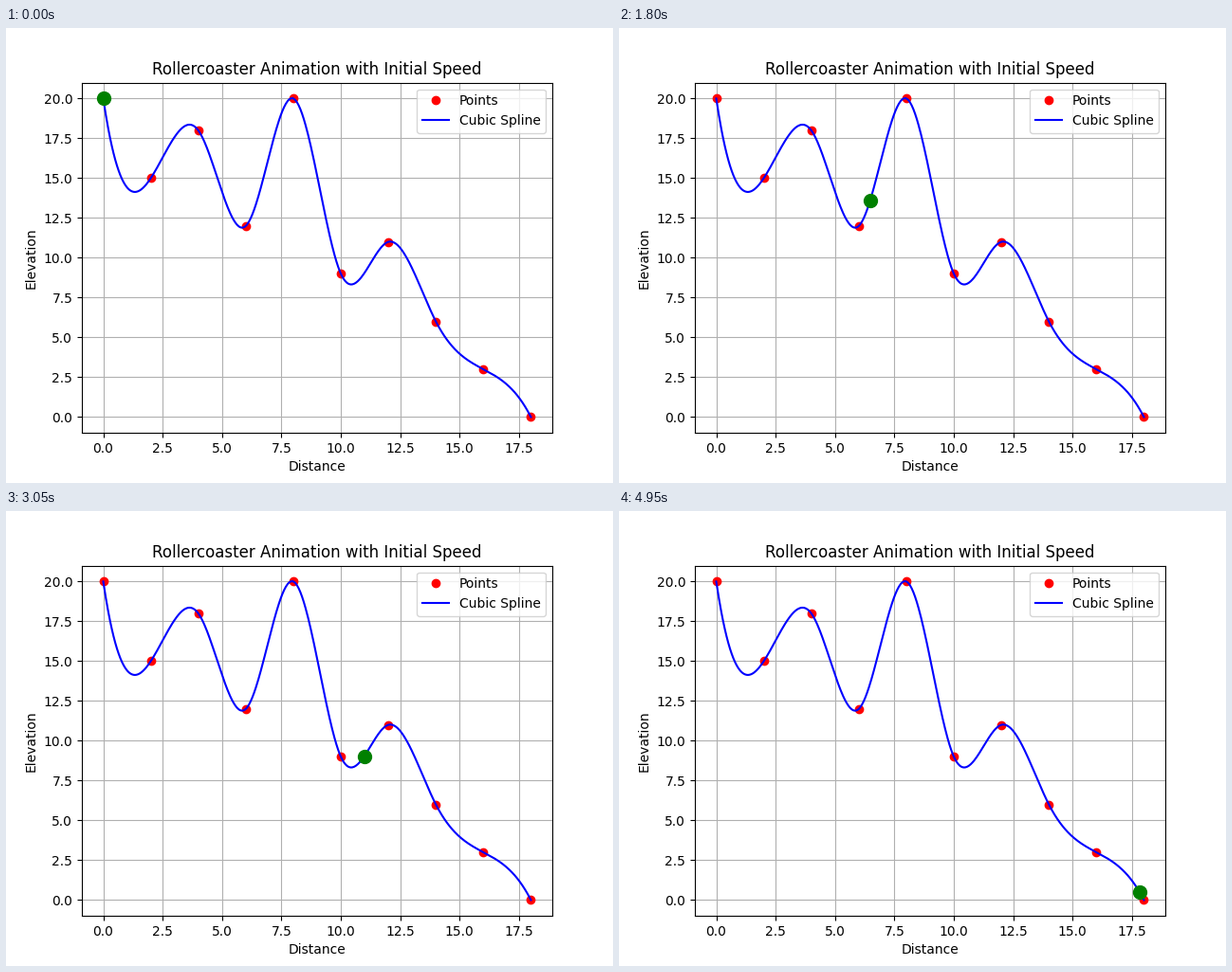
Recreate the animation shown at these times as a matplotlib script. Size 640 by 480 pixels, loop 5000 ms.

```python
import numpy as np
import matplotlib.pyplot as plt
from matplotlib.animation import FuncAnimation

FRAMES = 100
INTERVAL = 50
STEP = 2.0

plt.rcParams["font.family"] = "DejaVu Sans"

knots_y = np.array([20, 15, 18, 12, 20, 9, 11, 6, 3, 0], dtype=float)
knots_x = STEP * np.arange(len(knots_y))


def second_derivatives(y, h):
    """Second derivatives of the not-a-knot cubic spline on an even grid."""
    n = len(y)
    a = np.zeros((n, n))
    b = np.zeros(n)
    a[0, :3] = a[-1, -3:] = 1, -2, 1
    for i in range(1, n - 1):
        a[i, i - 1:i + 2] = 1, 4, 1
        b[i] = 6 * (y[i - 1] - 2 * y[i] + y[i + 1]) / h**2
    return np.linalg.solve(a, b)


bend = second_derivatives(knots_y, STEP)


def track(x):
    """Elevation of the track at distance x."""
    i = np.clip((np.asarray(x) / STEP).astype(int), 0, len(knots_y) - 2)
    t = x / STEP - i
    s = 1 - t
    linear = s * knots_y[i] + t * knots_y[i + 1]
    cubic = (s**3 - s) * bend[i] + (t**3 - t) * bend[i + 1]
    return linear + cubic * STEP**2 / 6


fig, ax = plt.subplots(figsize=(6.4, 4.8), dpi=100)
xs = np.linspace(0, knots_x[-1], 500)
ax.plot(knots_x, knots_y, "ro", label="Points")
ax.plot(xs, track(xs), "b-", label="Cubic Spline")
car, = ax.plot([0], [knots_y[0]], "go", markersize=10)

ax.set_title("Rollercoaster Animation with Initial Speed")
ax.set_xlabel("Distance")
ax.set_ylabel("Elevation")
ax.set_xlim(-0.9, 18.9)
ax.set_ylim(-1, 21)
ax.legend(loc="upper right")
ax.grid(True)


def update(frame):
    x = knots_x[-1] * frame / FRAMES
    car.set_data([x], [track(x)])
    return car,


def init():
    return update(0)


anim = FuncAnimation(fig, update, frames=FRAMES, init_func=init,
                     interval=INTERVAL, repeat=True, repeat_delay=0)
plt.show()
```
